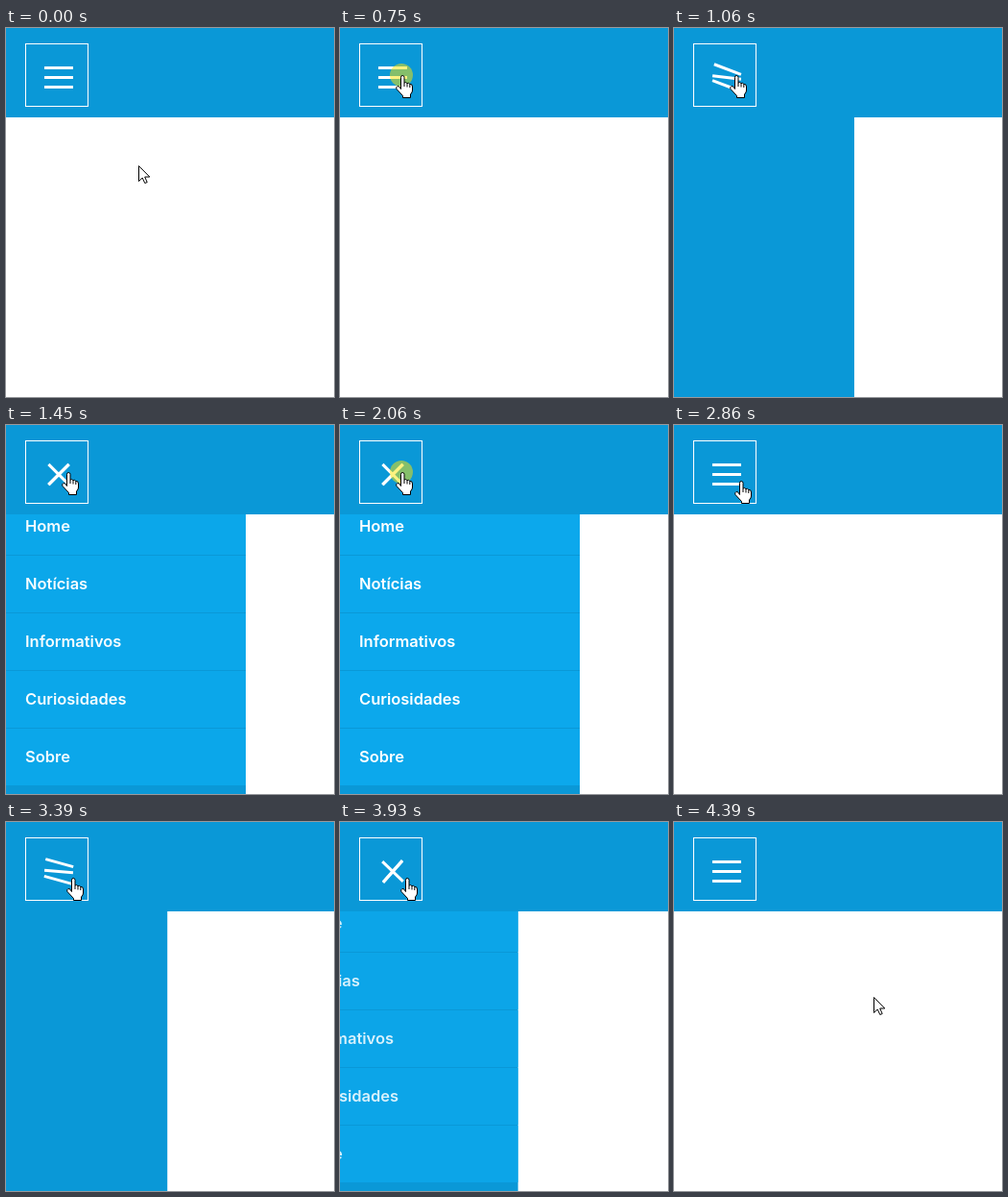
These frames come from a looping animation (342x384 px, 4470 ms). An HTML page with a canvas:

```html
<!DOCTYPE html>
<html lang="pt">
<head>
<meta charset="utf-8">
<title>Menu</title>
<style>
  html, body { margin: 0; width: 100%; height: 100%; overflow: hidden; background: #fff; }
  canvas { display: block; }
</style>
</head>
<body>
<canvas id="stage" width="342" height="384"></canvas>
<script>
const ctx = document.getElementById('stage').getContext('2d');
const LOOP = 4470;
const BLUE = '#0a98d7', ITEM = '#0ca8ec';
const HEADER = 93, PANEL = 250, ROW = 60;
const LABELS = ['Home', 'Notícias', 'Informativos', 'Curiosidades', 'Sobre'];

const TOGGLES = [
  { at: 925, open: true },
  { at: 2175, open: false },
  { at: 3273, open: true },
  { at: 3876, open: false }
];
const CLICKS = [[750, 900], [2060, 2140], [3240, 3310], [3780, 3860]];

const ARROW = new Path2D('M.5 .5V16.5L4.2 13L6.8 18.5L9.2 17.5L6.7 12H11.8Z');
const HAND = new Path2D('M5.5 14.5V2.3Q5.5 .5 7.2 .5T9 2.3V8Q10.5 6.8 12 8.6' +
  'Q13.6 7.6 14.8 9.4Q17.5 9 17.5 12V16Q17.5 18 15.5 20V23.5H7.5V21.5L1 14.5' +
  'Q0 12.6 1.8 11.6T5.5 14.5Z');
const KNUCKLES = new Path2D('M9 8V12M12 8.6V12.5M14.8 9.4V13');

const clamp = v => Math.min(1, Math.max(0, v));
const mix = (a, b, p) => a + (b - a) * p;

// CSS-style cubic-bezier, solved by bisection
function bezier(x1, y1, x2, y2) {
  const at = (a, b, u) => 3 * a * u * (1 - u) ** 2 + 3 * b * u * u * (1 - u) + u ** 3;
  return v => {
    if (v <= 0 || v >= 1) return clamp(v);
    let lo = 0, hi = 1;
    for (let i = 0; i < 24; i++) {
      const mid = (lo + hi) / 2;
      if (at(x1, x2, mid) < v) lo = mid; else hi = mid;
    }
    return at(y1, y2, lo);
  };
}
const ease = bezier(.25, .1, .25, 1);
const easeInOut = bezier(.42, 0, .58, 1);

function menuState(t) {
  const last = TOGGLES.filter(g => g.at <= t).pop();
  if (!last) return { slide: 0, fade: 0, burger: 0 };
  const dt = t - last.at;
  const toward = p => last.open ? p : 1 - p;
  return {
    slide: toward(ease(dt / 300)),
    fade: toward(last.open ? ease((dt - 300) / 300) : ease(dt / 400)),
    burger: toward(easeInOut(dt / 500))
  };
}

function pointer(t) {
  if (t < 2860) {
    const p = easeInOut((t - 60) / 510);
    return [mix(138, 64, p), mix(143, 49, p)];
  }
  const p = easeInOut((t - 4250) / 140);
  return [mix(69, 208, p), mix(58, 182, p)];
}

function drawPanel({ slide, fade }) {
  if (slide <= 0) return;
  ctx.save();
  ctx.translate(PANEL * (slide - 1), 0);
  ctx.fillStyle = BLUE;
  ctx.fillRect(0, HEADER, PANEL, 384 - HEADER);
  ctx.globalAlpha = fade;
  ctx.font = '600 16.5px Inter, sans-serif';
  LABELS.forEach((label, i) => {
    const y = 76 + ROW * i;
    ctx.fillStyle = ITEM;
    ctx.fillRect(0, y, PANEL, ROW - 1);
    ctx.fillStyle = '#fff';
    ctx.fillText(label, 20, y + 35);
  });
  ctx.restore();
}

function drawBar(x, y, degrees) {
  ctx.save();
  ctx.translate(x, y);
  ctx.rotate(degrees * Math.PI / 180);
  ctx.fillRect(-15, -1.5, 30, 3);
  ctx.restore();
}

function drawButton(p) {
  ctx.strokeStyle = ctx.fillStyle = '#fff';
  ctx.lineWidth = 1;
  ctx.strokeRect(20.5, 16.5, 65, 65);
  const dx = 8 * p * (1 - p) ** 2, dy = 10 * (1 - p);
  drawBar(55 + dx, 51.5 - dy, 135 * p);
  drawBar(55, 51.5, 45 * p);
  drawBar(55 - dx, 51.5 + dy, 135 * p);
}

function drawPointer(x, y) {
  const overButton = x >= 20 && x < 86 && y >= 16 && y < 82;
  const shape = overButton ? HAND : ARROW;
  ctx.save();
  ctx.translate(Math.round(x) - (overButton ? 6 : 0), Math.round(y));
  ctx.fillStyle = '#fff';
  ctx.strokeStyle = '#000';
  ctx.lineWidth = 1;
  ctx.fill(shape);
  ctx.stroke(shape);
  if (overButton) ctx.stroke(KNUCKLES);
  ctx.restore();
}

function draw(t) {
  const menu = menuState(t);
  const [x, y] = pointer(t);
  ctx.fillStyle = '#fff';
  ctx.fillRect(0, 0, 342, 384);
  drawPanel(menu);
  ctx.fillStyle = BLUE;
  ctx.fillRect(0, 0, 342, HEADER);
  drawButton(menu.burger);
  if (CLICKS.some(([from, to]) => t >= from && t < to)) {
    ctx.fillStyle = 'rgba(255, 230, 0, .5)';
    ctx.beginPath();
    ctx.arc(x, y, 12, 0, Math.PI * 2);
    ctx.fill();
  }
  drawPointer(x, y);
}

const start = performance.now();
function tick() {
  draw((performance.now() - start) % LOOP);
  requestAnimationFrame(tick);
}
tick();
</script>
</body>
</html>
```
